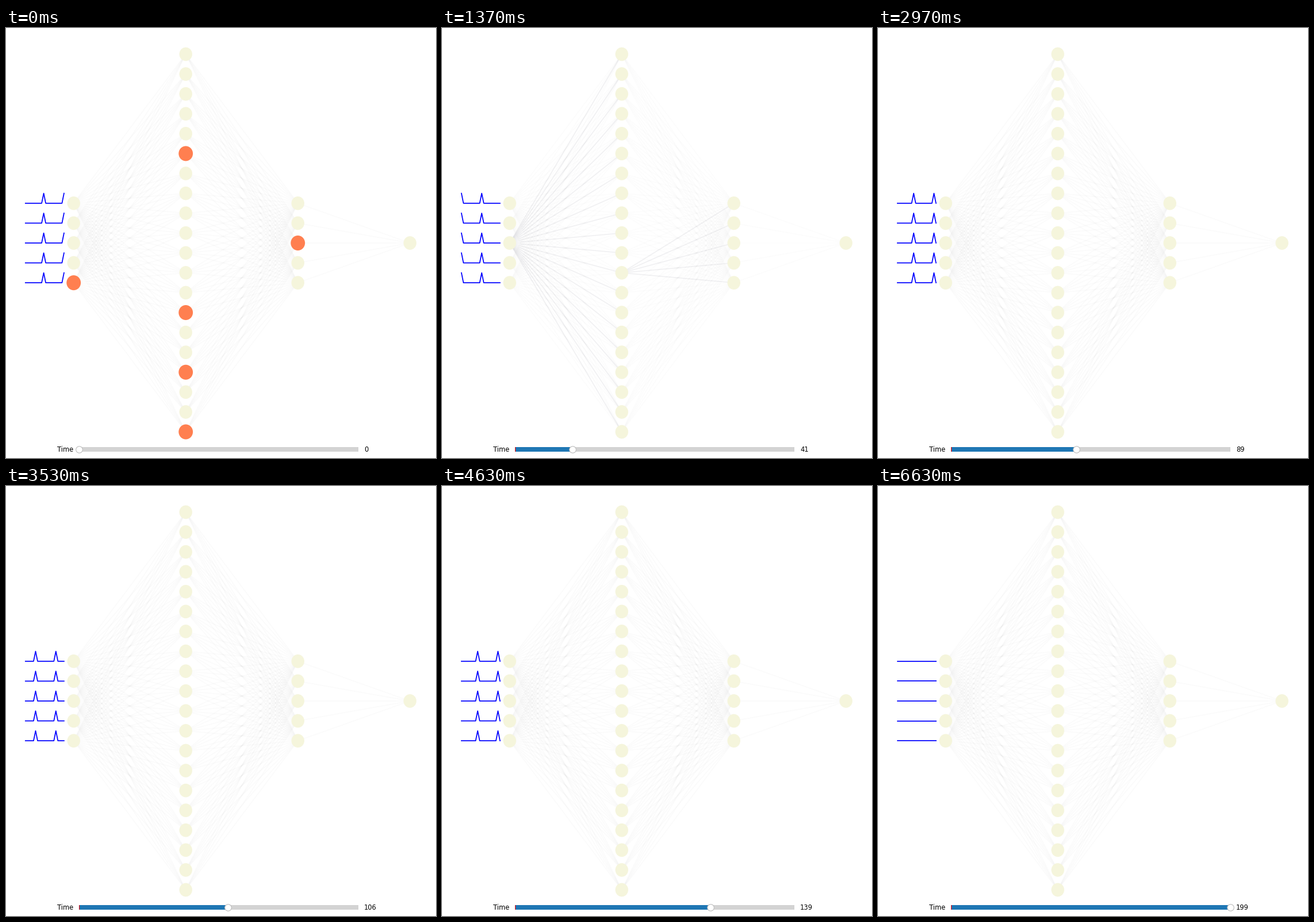
Animation, 748 px wide and 748 px high, one loop 6660 ms. Source, as a matplotlib script:

```python
import numpy as np
import matplotlib.pyplot as plt
from matplotlib.animation import FuncAnimation
from matplotlib.collections import LineCollection
from matplotlib.patches import Ellipse
from matplotlib.widgets import Slider

SIZE = 748
STEPS = 200
PERIOD = 10          # time steps between input spikes
WINDOW = 20          # time steps visible in each input trace
ROW = 34.58
LAYERS = (5, 20, 5, 1)

BEIGE, CORAL = "#f5f5dc", "#ff7f50"
REST = (0.5, 0.5, 0.5, 0.03)
DIM = (0.5, 0.5, 0.5, 0.02)
LIT = (0.46, 0.46, 0.52, 0.1)

FIRST = {(0, 4), (1, 5), (1, 13), (1, 16), (1, 19), (2, 2)}
ECHO = {(3, 0)}
BEAT = {(0, 2), (1, 11)}

plt.rcParams["font.family"] = "DejaVu Sans"
fig = plt.figure(figsize=(9, 9), dpi=SIZE / 9, facecolor="white")
ax = fig.add_axes([0, 0, 1, 1])
ax.set(xlim=(0, SIZE), ylim=(SIZE, 0))
ax.axis("off")


def position(layer, i):
    return 117.7 + 195 * layer, 374 + ROW * (i - (LAYERS[layer] - 1) / 2)


def fired(t):
    """Neurons that spike at time t, as (layer, index)."""
    if t == 0:
        return FIRST
    if t == 1:
        return ECHO
    return BEAT if t > 0 and t % PERIOD == 0 else set()


# Fully connected layers
links = [((k, i), (k + 1, j))
         for k in range(len(LAYERS) - 1)
         for i in range(LAYERS[k])
         for j in range(LAYERS[k + 1])]
edges = LineCollection([[position(*a), position(*b)] for a, b in links],
                       linewidths=1.5, zorder=1)
ax.add_collection(edges)

neurons = {}
for k, count in enumerate(LAYERS):
    for i in range(count):
        neurons[k, i] = ax.add_patch(
            Ellipse(position(k, i), 22.4, 23.6, lw=0, zorder=2))

# Input spike trains, padded with silence past the end
train = np.zeros(STEPS + WINDOW)
train[:STEPS:PERIOD] = 1
trace_x = np.linspace(33.8, 100.9, WINDOW)
traces = [ax.plot(trace_x, np.zeros(WINDOW), color="blue", lw=1.5, zorder=3)[0]
          for _ in range(LAYERS[0])]

slider = Slider(fig.add_axes([0.17, 0.01, 0.65, 0.02]), "Time", 0, STEPS - 1,
                valinit=0, valstep=1, valfmt="%d")
slider.drawon = False


def update(t):
    spikes = train[t:t + WINDOW][::-1]
    for i, trace in enumerate(traces):
        trace.set_ydata(position(0, i)[1] - ROW / 2 * spikes)

    active = fired(t)
    for key, node in neurons.items():
        on = key in active
        node.set(facecolor=CORAL if on else BEIGE,
                 width=24.8 if on else 22.4,
                 height=26 if on else 23.6)

    sources = fired(t - 1) - ECHO
    idle = DIM if sources else REST
    edges.set_color([LIT if a in sources else idle for a, _ in links])

    slider.set_val(t)
    return []


anim = FuncAnimation(fig, update, frames=STEPS, init_func=lambda: update(0),
                     interval=33.3, repeat=True, repeat_delay=0, blit=False)
plt.show()
```
